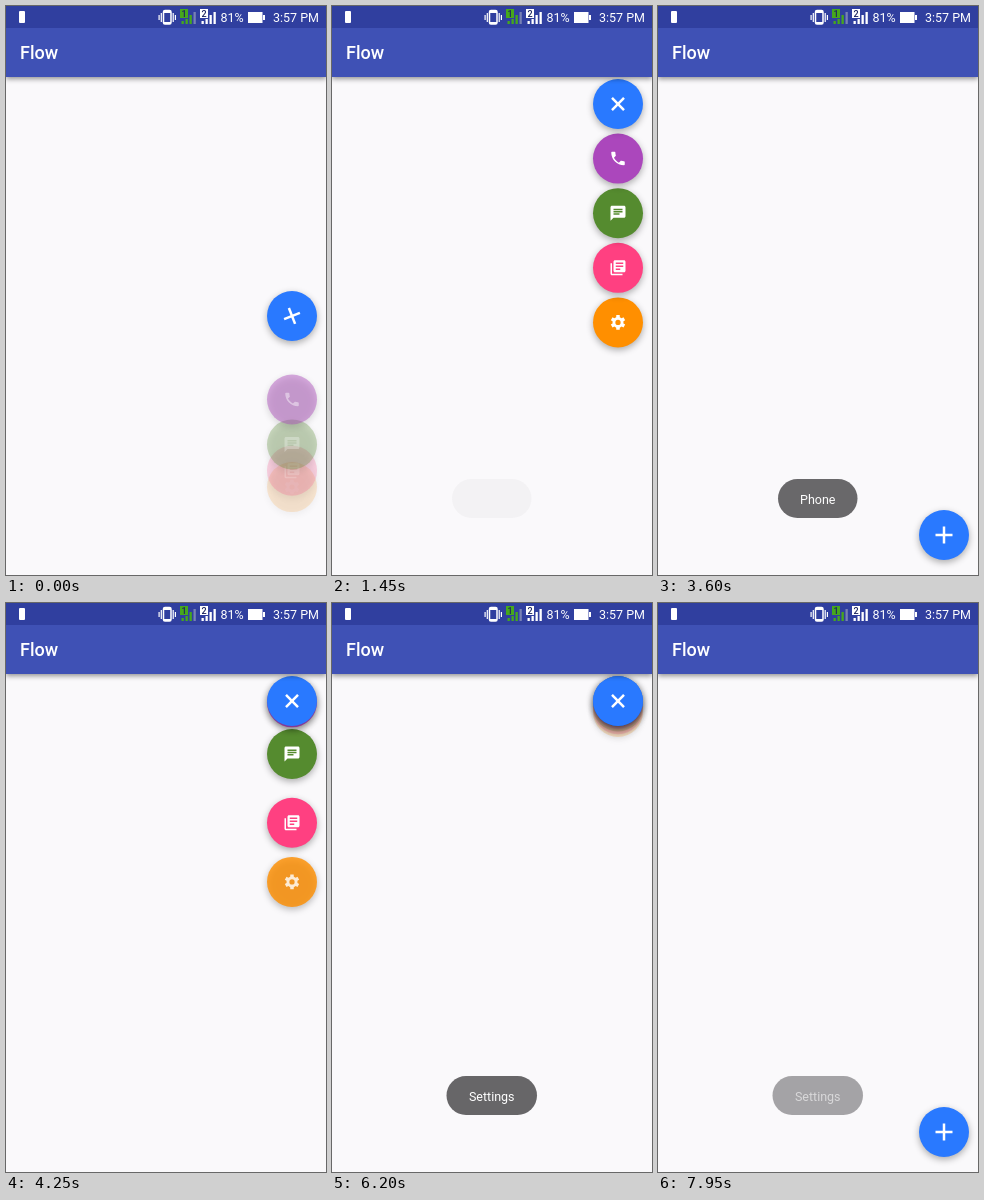
An HTML page with a canvas that plays this animation: 320 by 569 pixels, repeating every 8.05 s.

```html
<!DOCTYPE html>
<html lang="en">
<head>
<meta charset="utf-8">
<title>Flow</title>
<style>
  html, body { margin: 0; width: 100%; height: 100%; overflow: hidden; background: #faf9fb; }
  canvas { display: block; width: 320px; height: 569px; }
</style>
</head>
<body>
<canvas id="stage"></canvas>
<script>
const W = 320, H = 569, LOOP = 8050;
const canvas = document.getElementById('stage');
const ctx = canvas.getContext('2d');
const dpr = window.devicePixelRatio || 1;
canvas.width = W * dpr;
canvas.height = H * dpr;

const FAB_X = 286, FAB_R = 25, TOP = 98, BOTTOM = 529, GAP = 54.6;
const UNIT = 64, RISE = 7 * UNIT, BOUNCE = 800, SPIN = 135;

const ITEMS = [
  ['#ab47bc', 'M6.62 10.79c1.44 2.83 3.76 5.14 6.59 6.59l2.2-2.2c.27-.27.67-.36 1.02-.24 1.12.37 2.33.57 3.57.57.55 0 1 .45 1 1V20c0 .55-.45 1-1 1-9.39 0-17-7.61-17-17 0-.55.45-1 1-1h3.5c.55 0 1 .45 1 1 0 1.25.2 2.45.57 3.57.11.35.03.74-.25 1.02l-2.2 2.2z'],
  ['#558b2f', 'M20 2H4c-1.1 0-2 .9-2 2v18l4-4h14c1.1 0 2-.9 2-2V4c0-1.1-.9-2-2-2zM6 9h12v2H6zm8 5H6v-2h8zm4-6H6V6h12z'],
  ['#ff4081', 'M4 6H2v14c0 1.1.9 2 2 2h14v-2H4zM20 2H8c-1.1 0-2 .9-2 2v12c0 1.1.9 2 2 2h12c1.1 0 2-.9 2-2V4c0-1.1-.9-2-2-2zm-1 9H9V9h10zm-4 4H9v-2h6zm4-8H9V5h10z'],
  ['#ff8f00', gearPath()]
].map(([color, d]) => ({ color, icon: new Path2D(d) }));

// Each menu cycle: when it opens and when it closes.
const CYCLES = [{ open: -96, close: 1502 }, { open: 4004, close: 5460 }];
const TOASTS = [
  { text: 'Phone', x: 120, w: 79.5, from: 1440, to: 3540 },
  { text: 'Settings', x: 114.5, w: 90.5, from: 5490, to: 7625 }
];

const clamp = v => Math.min(1, Math.max(0, v));
const ease = p => (1 - Math.cos(Math.PI * clamp(p))) / 2;

function bounce(p) {
  const t = clamp(p) * 1.1226;
  if (t < 0.3535) return 8 * t * t;
  if (t < 0.7408) return 8 * (t - 0.54719) ** 2 + 0.7;
  if (t < 0.9644) return 8 * (t - 0.8526) ** 2 + 0.9;
  return Math.min(1, 8 * (t - 1.0435) ** 2 + 0.95);
}

function gearPath() {
  const pt = (r, a) => (12 + r * Math.sin(a)).toFixed(2) + ' ' + (12 - r * Math.cos(a)).toFixed(2);
  const pts = [];
  for (let i = 0; i < 6; i++) {
    const a = i * Math.PI / 3;
    pts.push(pt(7.4, a - 0.33), pt(10, a - 0.23), pt(10, a + 0.23), pt(7.4, a + 0.33));
  }
  return 'M' + pts.join('L') + 'zM12 8.5a3.5 3.5 0 1 0 0 7a3.5 3.5 0 1 0 0-7z';
}

function pose(t) {
  const { open, close } = CYCLES[t < CYCLES[1].open ? 0 : 1];
  const lerp = f => BOTTOM + (TOP - BOTTOM) * f;
  const fan = (k, alpha) => ITEMS.map((_, i) => ({ y: TOP + k * GAP * (i + 1), alpha }));
  const fall = t - close - BOUNCE;
  if (fall >= 0) {
    return {
      y: lerp(1 - bounce(fall / BOUNCE)),
      spin: SPIN * (1 - ease(fall / 210)),
      glow: 1 - clamp(fall / BOUNCE),
      subs: []
    };
  }
  if (t >= close) {
    const p = (t - close) / BOUNCE;
    return { y: TOP, spin: SPIN, glow: p, subs: fan(1 - bounce(p), 1 - p ** 3) };
  }
  const a = t - open;
  const rise = ease(a / (3 * UNIT));
  const subs = a < RISE
    ? ITEMS.map((_, i) => {
        const f = ease(a / (UNIT * (4 + i)));
        return { y: lerp(f), alpha: clamp(1.4 * f) };
      })
    : fan(bounce((a - RISE) / BOUNCE), 1);
  return { y: lerp(rise), spin: SPIN * rise, glow: 0, subs };
}

function shadow(color, blur, dy) {
  ctx.shadowColor = color;
  ctx.shadowBlur = blur * dpr;
  ctx.shadowOffsetY = dy * dpr;
}

function rect(color, x, y, w, h) {
  ctx.fillStyle = color;
  ctx.fillRect(x, y, w, h);
}

function pill(x, y, w, h, r) {
  ctx.beginPath();
  ctx.roundRect(x, y, w, h, r);
}

function label(text, x, y, font, color = '#fff', align = 'left') {
  ctx.font = font + ' Roboto, sans-serif';
  ctx.textAlign = align;
  ctx.fillStyle = color;
  ctx.fillText(text, x, y);
}

function fab(y, color, alpha, glow, drawIcon) {
  ctx.save();
  ctx.globalAlpha = alpha;
  ctx.translate(FAB_X, y);
  ctx.fillStyle = color;
  ctx.beginPath();
  ctx.arc(0, 0, FAB_R, 0, Math.PI * 2);
  if (glow > 0) {
    shadow(`rgba(0,0,0,${0.45 * glow})`, 7, 1.5);
    ctx.fill();
  }
  shadow('rgba(0,0,0,.32)', 7, 2.5);
  ctx.fill();
  shadow('transparent', 0, 0);
  drawIcon();
  ctx.restore();
}

function itemIcon(path) {
  ctx.scale(0.75, 0.75);
  ctx.translate(-12, -12);
  ctx.fillStyle = '#fff';
  ctx.fill(path, 'evenodd');
}

function plusIcon(deg) {
  ctx.rotate(deg * Math.PI / 180);
  rect('#fff', -8.5, -1.25, 17, 2.5);
  rect('#fff', -1.25, -8.5, 2.5, 17);
}

function signal(x, n, color, tag, last) {
  rect(tag, x, 3, 8, 9);
  label(n, x + 4, 10.5, '500 9px', '#1b2360', 'center');
  [3, 5, 9, 12].forEach((h, i) => rect(i === 3 ? last : color, x + 1.5 + i * 4, 18 - h, 2.3, h));
}

function statusBar() {
  rect('#303f9f', 0, 0, W, 22);
  ctx.fillStyle = '#fff';
  pill(13, 5, 6, 12, 1);
  ctx.fill();

  ctx.strokeStyle = '#fff';
  ctx.lineWidth = 1.5;
  pill(157.5, 4.5, 7.5, 13.5, 1.5);
  ctx.stroke();
  rect('#fff', 158, 5, 7, 2);
  rect('#fff', 158, 16, 7, 2);
  for (const [x, h] of [[152.5, 5], [154.7, 9], [166.6, 9], [168.8, 5]]) {
    rect('#fff', x, 11.5 - h / 2, 1.2, h);
  }

  signal(174, '1', '#46a81c', '#46a81c', '#7781b5');
  signal(194, '2', '#fff', '#fff', '#fff');
  label('81%', 214.5, 16, '400 12.5px');
  rect('#fff', 242, 6, 14.5, 11);
  rect('#fff', 257, 9, 2, 5);
  label('3:57 PM', 313, 16, '400 12.5px', '#fff', 'right');
}

function appBar() {
  shadow('rgba(0,0,0,.42)', 5, 2);
  rect('#3f51b5', 0, 20, W, 51);
  shadow('transparent', 0, 0);
  label('Flow', 14, 53, '500 18px');
}

function toast({ text, x, w, from, to }, t) {
  const inP = clamp((t - from) / 500), outP = clamp((t - to) / 500);
  const alpha = (1 - (1 - inP) ** 2) * (1 - outP ** 2);
  if (alpha <= 0) return;
  ctx.save();
  ctx.globalAlpha = alpha;
  ctx.fillStyle = '#676668';
  pill(x, 473, w, 39, 19.5);
  ctx.fill();
  label(text, x + w / 2, 497.5, '400 12.5px', '#fff', 'center');
  ctx.restore();
}

function draw(t) {
  ctx.setTransform(dpr, 0, 0, dpr, 0, 0);
  rect('#faf9fb', 0, 0, W, H);
  const { y, spin, glow, subs } = pose(t);
  for (let i = subs.length - 1; i >= 0; i--) {
    fab(subs[i].y, ITEMS[i].color, subs[i].alpha, 0, () => itemIcon(ITEMS[i].icon));
  }
  fab(y, '#2979ff', 1, glow, () => plusIcon(spin));
  appBar();
  statusBar();
  TOASTS.forEach(item => toast(item, t));
}

const start = performance.now();
function tick() {
  draw((performance.now() - start) % LOOP);
  requestAnimationFrame(tick);
}
tick();
</script>
</body>
</html>
```
